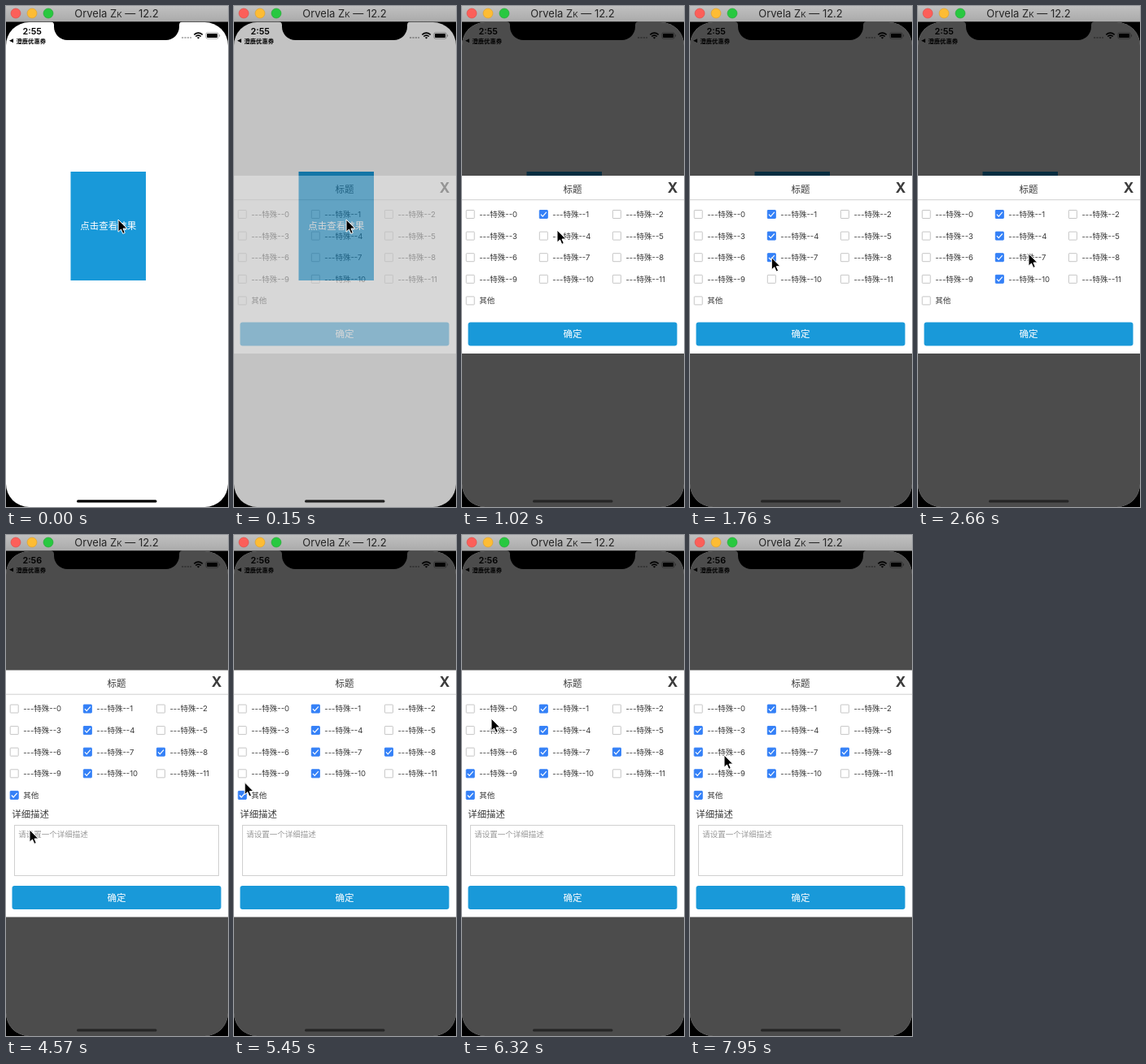
Write an HTML page that moves like this. It is 273 px wide and 617 px high and loops after 8000 ms.

```html
<!DOCTYPE html>
<html lang="zh">
<head>
<meta charset="utf-8">
<title>标题</title>
<style>
html, body { margin: 0; width: 100%; height: 100%; overflow: hidden; background: #000; }
svg { display: block; width: 273px; height: 617px; }
text { font-family: Inter, "Noto Sans CJK SC", "Noto Sans CJK", sans-serif; fill: #3a3a3a; white-space: pre; }
.mid { text-anchor: middle; }
.white { fill: #fff; }
.bold { font-weight: 600; fill: #000; }
.blue { fill: #1999d9; }
.box { fill: #fff; stroke: #c6c6c6; }
.box.dark { stroke: #777; }
.box.on { fill: #3480f7; stroke: #3480f7; }
.tick { fill: none; stroke: #fff; stroke-width: 1.2; }
</style>
</head>
<body>
<svg viewBox="0 0 273 617" xmlns="http://www.w3.org/2000/svg">
  <defs>
    <linearGradient id="bar" x2="0" y2="1">
      <stop offset="0" stop-color="#c0c0c0"/><stop offset="1" stop-color="#aaa"/>
    </linearGradient>
  </defs>

  <rect width="273" height="617"/>
  <rect width="273" height="19.5" fill="url(#bar)"/>
  <g stroke-width=".6">
    <circle cx="12" cy="9" r="6" fill="#fc5f59" stroke="#de4742"/>
    <circle cx="32" cy="9" r="6" fill="#fdbc34" stroke="#dc9d27"/>
    <circle cx="52" cy="9" r="6" fill="#28c840" stroke="#1fa532"/>
  </g>
  <text class="mid" x="136" y="14" font-size="13" style="fill:#262626">Orvela Z<tspan font-size="9.5">K</tspan> — 12.2</text>

  <rect y="20" width="273" height="597" rx="28.5" fill="#fff"/>
  <rect class="blue" x="79.5" y="204" width="92.5" height="134"/>
  <text class="mid white" x="125.7" y="275" font-size="11.5">点击查看结果</text>
  <path d="M216 39h12" stroke="#b5b5b5" stroke-width="2.2" stroke-dasharray="2.2 1.2"/>

  <rect id="dim" y="20" width="273" height="597" rx="28.5" opacity="0"/>

  <path d="M55 19.5a4 4 0 0 1 4 4v2a16.5 16.5 0 0 0 16.5 16.5h121a16.5 16.5 0 0 0 16.5-16.5v-2a4 4 0 0 1 4-4z"/>
  <text id="clock" class="bold mid" x="32.3" y="35.3" font-size="10.8">2:55</text>
  <path d="M4 42.8L9 40.3V45.3Z"/>
  <text class="bold" x="12.5" y="45.6" font-size="7.3">澄鹿优惠券</text>
  <path d="M231.3 35.3Q236.5 30.8 241.7 35.3M233.2 37.5Q236.5 34.7 239.8 37.5" fill="none" stroke="#000" stroke-width="1.6"/>
  <path d="M234.7 38.8Q236.5 37.5 238.3 38.8L236.5 40.6Z"/>
  <rect x="245.8" y="32.8" width="15.4" height="7.4" rx="2" fill="none" stroke="#000" stroke-opacity=".4" stroke-width=".8"/>
  <rect x="247" y="34" width="13" height="5" rx="1"/>
  <path d="M262.2 35v3q1-.4 1-1.5t-1-1.5" fill-opacity=".4"/>
  <rect id="home" x="87" y="608.2" width="98.5" height="3.4" rx="1.7"/>

  <g id="panel" opacity="0">
    <rect id="sheet" width="273" fill="#fff"/>
    <text class="mid" x="136" y="20.8" font-size="11.5">标题</text>
    <text class="mid" x="259" y="20.6" font-size="17" font-weight="700">X</text>
    <rect y="29.2" width="273" height="1" fill="#cfcfcf"/>
    <g id="list"></g>
    <g id="extra">
      <text x="7.3" y="181.2" font-size="11.4">详细描述</text>
      <rect x="10.5" y="191" width="251" height="62" fill="#fff" stroke="#d0d0d0"/>
      <text x="15.3" y="205" font-size="9.5" style="fill:#989898">请设置一个详细描述</text>
    </g>
    <g id="confirm">
      <rect class="blue" x="7.5" width="257" height="29" rx="3"/>
      <text class="mid white" x="136" y="18.8" font-size="11.5">确定</text>
    </g>
  </g>

  <path id="cursor" d="M0 0V15.2L3.5 12L5.8 17.4L8.3 16.3L6 11H10.8Z" stroke="#fff"/>
</svg>
<script>
const LOOP = 8000, STEP = 147.2, LEAD = 12;
const OPEN = 3, EXPAND = 30, MINUTE = 27, OTHER = 12;

// pointer stops: [step, option] clicks a box, [step, x, y] only passes
const stops = [
  [0, 138, 263], [2, 138, 263], [6, 1], [7, 117, 276], [10, 4], [12, 7], [14, 10],
  [18, 136, 305], [21, 8], [22, 222, 318], [24, 7], [25, 124, 317], [26, 7],
  [28, 20, 363], [EXPAND, OTHER], [31, 29, 363], [39, 9], [43, 36, 226],
  [46, 3], [48, 9, 256], [51, 6], [54, 42, 271]
];

const $ = id => document.getElementById(id);
const sheetHeight = k => k >= EXPAND ? 304 : 219;
const sheetTop = k => 318.5 - sheetHeight(k) / 2;
const boxAt = i => [10.2 + (i % 3) * 90.1, 47.5 + Math.floor(i / 3) * 26.6];

const path = stops.map(([k, a, b]) => {
  if (b !== undefined) return [k, a, b];
  const [x, y] = boxAt(a);
  return [k, x, y + sheetTop(k - 1)];
});

const boxes = Array.from({ length: OTHER + 1 }, (_, i) => {
  const g = document.createElementNS("http://www.w3.org/2000/svg", "g");
  g.setAttribute("transform", `translate(${boxAt(i)})`);
  g.innerHTML = `<rect class="box" x="-5" y="-5" width="10" height="10" rx=".6"/>
    <path class="tick" d="M-3.4 .1L-1.1 2.6L3.5 -2.6"/>
    <text x="11" y="3.4" font-size="9.5">${i < OTHER ? "---特殊--" + i : "其他"}</text>`;
  $("list").append(g);
  return { rect: g.children[0], tick: g.children[1] };
});

function pointAt(k) {
  const i = path.findIndex(p => p[0] > k);
  if (i < 0) return path[path.length - 1].slice(1);
  const [a, ax, ay] = path[i - 1], [b, bx, by] = path[i];
  const u = (k - a) / (b - a);
  const e = u * u * (3 - 2 * u);
  return [ax + (bx - ax) * e, ay + (by - ay) * e];
}

function move(id, x, y) {
  $(id).setAttribute("transform", `translate(${x} ${y})`);
}

function draw(t) {
  const k = Math.floor((t + LEAD) / STEP);
  const shown = Math.min(1, k / OPEN);
  const height = sheetHeight(k);

  $("dim").setAttribute("opacity", .7 * shown);
  $("home").setAttribute("opacity", 1 - .5 * shown);
  $("panel").setAttribute("opacity", shown);
  $("sheet").setAttribute("height", height);
  $("extra").style.display = k >= EXPAND ? "" : "none";
  $("clock").textContent = k >= MINUTE ? "2:56" : "2:55";
  move("panel", 0, sheetTop(k));
  move("confirm", 0, height - 38.5);
  move("cursor", ...pointAt(k));

  boxes.forEach(({ rect, tick }, i) => {
    const count = stops.filter(s => s.length === 2 && s[1] === i && s[0] <= k).length;
    const on = count % 2 === 1;
    rect.setAttribute("class", "box" + (on ? " on" : count ? " dark" : ""));
    tick.style.display = on ? "" : "none";
  });
}

function tick() {
  draw(performance.now() % LOOP);
  requestAnimationFrame(tick);
}
tick();
</script>
</body>
</html>
```
